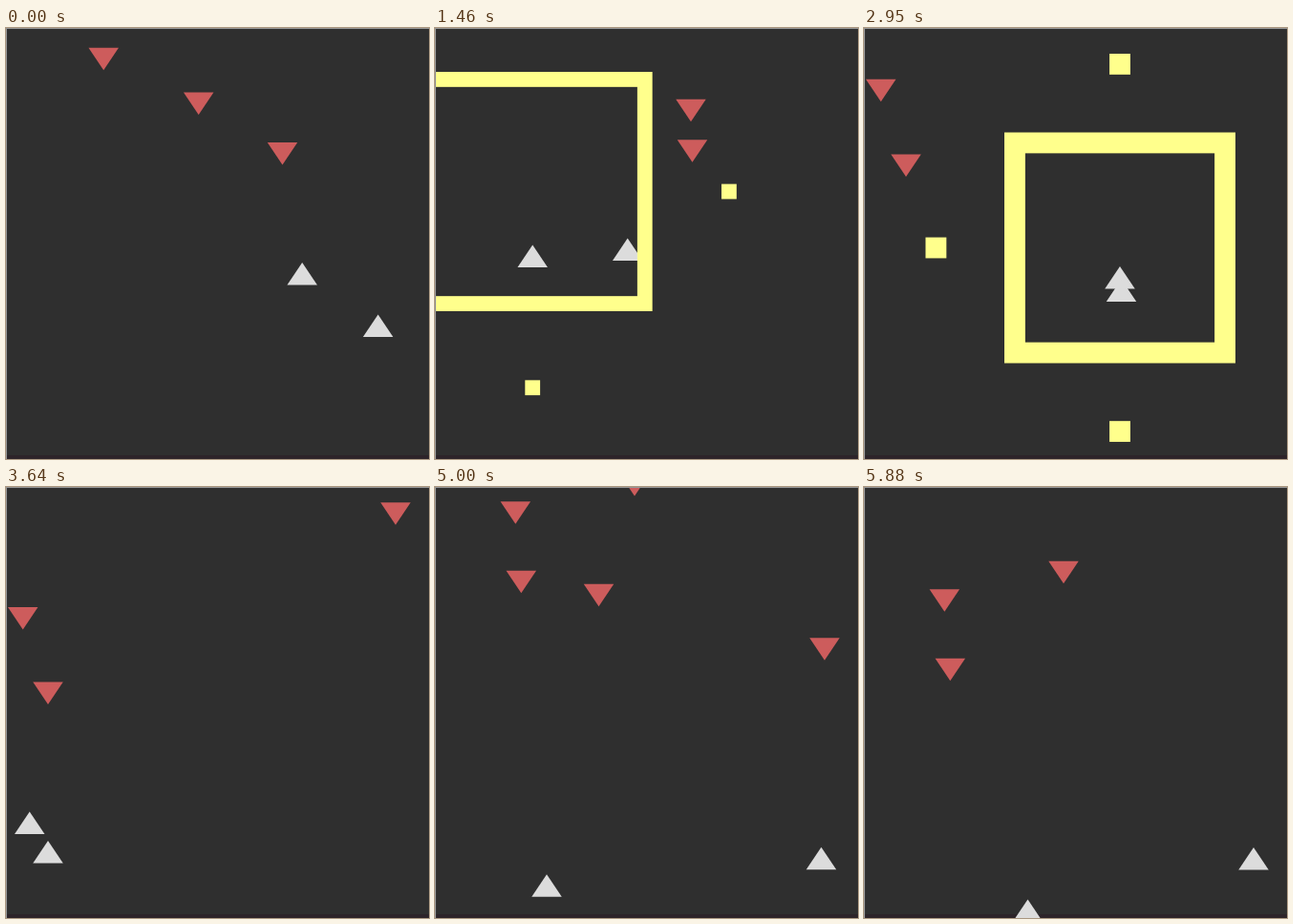
An HTML page with a canvas that plays this animation: 443x452 px, repeating every 5.98 s.

```html
<!DOCTYPE html>
<html lang="en">
<head>
<meta charset="utf-8">
<title>Falling triangles</title>
<style>
html, body { margin: 0; width: 100%; height: 100%; overflow: hidden; background: #2f2f2f; }
canvas { display: block; }
</style>
</head>
<body>
<canvas id="stage" width="443" height="452"></canvas>
<script>
const ctx = document.getElementById('stage').getContext('2d');
const W = 443, H = 452, LOOP = 5980, END = 5880;
const RED = '#cd5c5c', WHITE = '#dcdcdc', YELLOW = '#ffff8c';
const TRI_W = 31.5, TRI_H = 23.5;
const FALL = 0.1045, SPEED = 0.5; // px per ms
const BLAST = 231;

const enemy = (x, y, hit, stand) => ({ x, y, hit, stand });

// Each player flies below its next enemy, waits, and hits it.
// An enemy has its column, height and time of the hit, and the player's height.
const PLAYERS = [
  {
    x: 390.5, y: 300.5, wait: 88,
    targets: [
      enemy(289.5, 162, 290, 309),
      enemy(102.2, 171.5, 1332, 227.5),
      enemy(268, 230.5, 2840, 250),
      enemy(17.7, 148.4, 3744, 343),
      enemy(408, 180, 5096, 378)
    ]
  },
  {
    x: 310.2, y: 246, wait: 223,
    targets: [
      enemy(201.7, 149, 668, 220.5),
      enemy(269.5, 179, 1940, 263.5),
      enemy(44, 222, 3695, 371),
      enemy(171.5, 149.4, 5345, 432.5)
    ]
  }
];
const survivors = [[84.3, 119], [90.3, 191.5], [209, 89.7]].map(([x, y]) => enemy(x, y, END + 1));
const enemies = [...PLAYERS.flatMap(p => p.targets), ...survivors];

function triangle(x, top, up, color) {
  const base = up ? top + TRI_H : top;
  const tip = up ? top : top + TRI_H;
  ctx.fillStyle = color;
  ctx.beginPath();
  ctx.moveTo(x - TRI_W / 2, base);
  ctx.lineTo(x + TRI_W / 2, base);
  ctx.lineTo(x, tip);
  ctx.fill();
}

function drawEnemy(e, t) {
  triangle(e.x, e.y + FALL * (t - e.hit) - TRI_H / 2, false, RED);
}

function drawPlayer({ x, y, wait, targets }, t) {
  for (const target of targets) {
    const dx = target.x - x, dy = target.stand - y;
    const travel = Math.hypot(dx, dy) / SPEED;
    const depart = target.hit - wait - travel;
    if (t < depart) break;
    const p = Math.min((t - depart) / travel, 1);
    x += dx * p;
    y += dy * p;
  }
  triangle(x, y, true, WHITE);
}

function square(x, y, size) {
  ctx.fillRect(x - size / 2, y - size / 2, size, size);
}

// A frame and four squares that ease outwards while they thin; early blasts reach further
function drawBlast({ x, y, hit }, t) {
  const left = 1 - (t - hit) / BLAST;
  const reach = 224 + 81 * Math.exp(-hit / 311);
  const dist = reach * (1 - left ** 3);
  const thick = 81 * left ** 2;
  const half = dist / 1.75;
  ctx.fillStyle = ctx.strokeStyle = YELLOW;
  ctx.lineWidth = thick;
  ctx.strokeRect(x - half, y - half, half * 2, half * 2);
  for (const side of [-dist, dist]) {
    square(x + side, y, thick);
    square(x, y + side, thick);
  }
}

function rect(color, x, y, w, h) {
  ctx.fillStyle = color;
  ctx.fillRect(x, y, w, h);
}

function draw(t) {
  rect('#2f2f2f', 0, 0, W, H);
  rect('#2d2429', 0, 448, W, 4);
  enemies.filter(e => t < e.hit).forEach(e => drawEnemy(e, t));
  PLAYERS.forEach(p => drawPlayer(p, t));
  enemies.filter(e => t >= e.hit && t < e.hit + BLAST).forEach(e => drawBlast(e, t));
  rect('#969696', 0, 0, W, 1);
  rect('#969696', 0, 0, 1, H);
}

const start = performance.now();
function tick() {
  draw(Math.min((performance.now() - start) % LOOP, END));
  requestAnimationFrame(tick);
}
tick();
</script>
</body>
</html>
```
